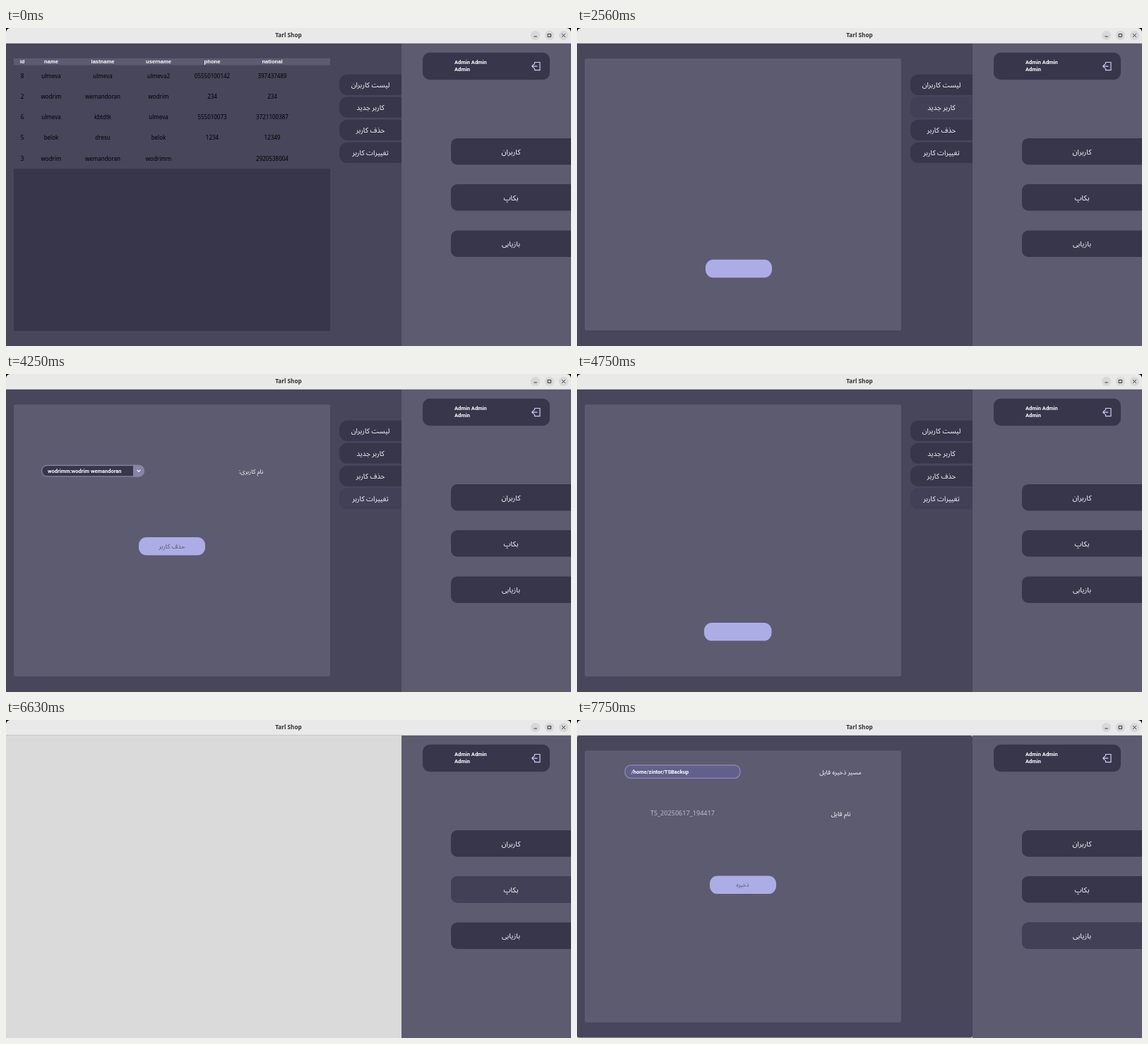
An HTML page that plays this animation: 800x450 px, repeating every 8000 ms.

```html
<!DOCTYPE html>
<html lang="fa">
<head>
<meta charset="utf-8">
<title>Tarl Shop</title>
<style>
  html, body { margin: 0; width: 100%; height: 100%; overflow: hidden; background: #000; }
  svg { display: block; width: 100vw; height: 100vh; }
  text { font-family: "Noto Sans", "Noto Sans Arabic", "DejaVu Sans", sans-serif; text-anchor: middle; fill: #fff; }
  .rtl { direction: rtl; }
  .head { font: bold 7.6px "Liberation Sans", sans-serif; }
  .cell { font-size: 8px; fill: #000; }
  .ui { font: 600 7.5px Roboto, sans-serif; text-anchor: start; }
  .panel { fill: #5c5b70; }
  .dark { fill: #37364b; }
  .hover { fill: #424056; }
  .action { fill: #adade6; }
  .input { fill: #615f8c; stroke: #8d8bb0; stroke-width: 1.3; }
  .line { fill: none; stroke-linecap: round; stroke-linejoin: round; }
</style>
</head>
<body>
<svg id="stage" viewBox="0 0 800 450" preserveAspectRatio="none"></svg>
<script>
const LOOP = 8000;

const rect = (x, y, w, h, r, cls) =>
  `<rect x="${x}" y="${y}" width="${w}" height="${h}" rx="${r}" class="${cls}"/>`;
const text = (x, y, size, str, cls = "", fill = "") =>
  `<text x="${x}" y="${y + size * 0.35}" class="${cls}" style="font-size:${size}px;${fill && "fill:" + fill}">${str}</text>`;
const label = (x, y, str, size = 8.5) => text(x, y + 0.4, size, str, "rtl");

// Content that is visible only from one moment to another
const during = (from, to, content) => `<g data-from="${from}" data-to="${to}">${content}</g>`;

// Button that runs off to the right, with rounded left corners
function tab(x, y, w, h, r, size, textX, str, from, to) {
  const d = `M${x + w} ${y}H${x + r}a${r} ${r} 0 0 0 ${-r} ${r}v${h - 2 * r}a${r} ${r} 0 0 0 ${r} ${r}H${x + w}z`;
  const lit = from ? during(from, to, `<path class="hover" d="${d}"/>`) : "";
  return `<path class="dark" d="${d}"/>${lit}${label(textX, y + h / 2, str, size)}`;
}
const sideTab = (y, str, from, to) => tab(472, y, 88, 29.2, 11.5, 10, 516, str, from, to);
const mainTab = (y, str, from, to) => tab(630, y, 170, 37.5, 9, 10.3, 715, str, from, to);

const panel = rect(11, 43.3, 448, 384.7, 2.5, "panel");
const input = (x, y, w) => rect(x + 0.6, y + 0.6, w - 1.2, 18.6, 8, "input");
const action = (x, y, w = 94) => rect(x, y, w, 25.6, 11, "action");
const actionText = (x, y, str, size = 9) => text(x, y, size, str, "rtl", "#55546a");

function combo(x, y, w, str = "") {
  const split = x + w - 16, right = x + w, cx = split + 8, cy = y + 8.3;
  return rect(x + 0.6, y + 0.6, w - 1.2, 15.4, 7.5, "dark") +
    `<path fill="#8784a6" d="M${split} ${y}H${right - 8}a8 8 0 0 1 8 8v.6a8 8 0 0 1 -8 8H${split}z"/>
     <rect x="${x + 0.6}" y="${y + 0.6}" width="${w - 1.2}" height="15.4" rx="7.5" fill="none" stroke="#8784a6" stroke-width="1.2"/>
     <path class="line" stroke="#fff" stroke-width="1.3" d="M${cx - 2} ${cy - 1}l2 2l2 -2"/>
     <text class="ui" x="${x + 9}" y="${y + 10.8}">${str}</text>`;
}

const columns = [[23, "id"], [64, "name"], [137, "lastname"], [216, "username"], [292, "phone"], [377, "national"]];
const users = [
  ["8", "ulmeva", "ulmeva", "ulmeva2", "05550100142", "397437489"],
  ["2", "wodrim", "wemandoran", "wodrim", "234", "234"],
  ["6", "ulmeva", "kbtdtk", "ulmeva", "555010073", "3721100387"],
  ["5", "belok", "dresu", "belok", "1234", "12349"],
  ["3", "wodrim", "wemandoran", "wodrimm", "", "2920538004"]
];

const table = rect(11, 43, 448, 9.6, 0, "panel") + rect(11, 199, 448, 229.7, 0, "dark") +
  columns.map(([x, name], i) =>
    text(x, 47.3, 7.6, name, "head") +
    users.map((user, row) => text(x, 67.7 + row * 29.25, 8, user[i], "cell")).join("")
  ).join("");

// Two-column user fields, starting at the given row centre
const fields = y =>
  input(31, y - 10, 96.5) + label(149, y, "نام:") +
  input(311.5, y - 10, 73) + label(418, y, "نام خانوادگی:") +
  input(31, y + 49, 76.5) + label(139, y + 59, "شماره ملی:") +
  input(311.5, y + 49, 74) + label(418.5, y + 59, "شماره تلفن:") +
  input(31, y + 108, 81) + label(142, y + 118, "نام کاربری:");

const screens =
  during(0, 2500, table) +
  during(2500, 3560, panel + action(182, 327.7)) +
  during(2630, 3560, fields(73) + actionText(229, 340.5, "کاربر جدید")) +
  during(3560, 4690, panel + action(188, 231)) +
  during(3630, 4690, combo(50, 128.8, 146, "wodrimm:wodrim wemandoran") +
    label(347, 137.5, "نام کاربری:") + actionText(235, 244, "حذف کاربر")) +
  during(4690, 6630, panel + action(180, 352, 95.5)) +
  during(4810, 6630, text(95, 68.3, 8.7, "Username:") + combo(194.5, 59.7, 82) +
    fields(122) + actionText(228, 365, "بروزرسانی اطلاعات"));

const userArea = `<rect y="22" width="560" height="428" fill="#47465b"/>` +
  sideTab(65.8, "لیست کاربران") +
  sideTab(97.6, "کاربر جدید", 2250, 3060) +
  sideTab(129.7, "حذف کاربر", 3130, 4250) +
  sideTab(161.8, "تغییرات کاربر", 4250, 5380) + screens;

const backupArea = `<rect y="22" width="560" height="427.5" rx="3" fill="#47465b"/>` + panel + action(188, 220.5);
const backupForm = `${input(67.5, 63.2, 164)}<text class="ui" x="77" y="75.6">/home/zintor/TSBackup</text>` +
  label(373, 73.5, "مسیر ذخیره فایل", 9) +
  text(149.5, 132.3, 9.1, "TS_20250617_194417", "", "#bdbcca") +
  label(373.5, 132.5, "نام فایل", 9) + actionText(234.5, 233.3, "ذخیره", 8.2);

const sidebar = `<rect x="560" y="22" width="240" height="428" class="panel"/>` +
  rect(590, 34.8, 180, 38.4, 10, "dark") +
  `<text class="ui" x="635" y="51.2">Admin Admin</text><text class="ui" x="635" y="61.2">Admin</text>
   <path class="line" stroke="#cdcdf2" stroke-width="1.2"
     d="M748.5 50.8v-2.3h7.5v11.2h-7.5v-2.3M752 54.1h-7.3m2.6 -2.6l-2.6 2.6l2.6 2.6"/>` +
  mainTab(155.9, "کاربران", 5500, 6250) +
  mainTab(221, "بکاپ", 6380, 7630) +
  mainTab(286.5, "بازیابی", 7750, LOOP);

const titleBar = `<path fill="#e9e9e9" d="M0 22V6a6 6 0 0 1 6 -6H794a6 6 0 0 1 6 6V22z"/>
  <rect y="21" width="800" height="1" fill="#c9c9c9"/>` +
  `<text x="400" y="13.4" style="font-weight:700;font-size:8.2px;fill:#303030">Tarl Shop</text>` +
  [749.5, 769.5, 789.5].map(x => `<circle cx="${x}" cy="10.5" r="6.6" fill="#d8d8d8"/>`).join("") +
  `<path class="line" stroke="#333" d="M747.8 12h3.6M767.5 8.5h4v4h-4zM787.4 8.4l4.2 4.2m0 -4.2l-4.2 4.2"/>`;

const stage = document.getElementById("stage");
stage.innerHTML = `<rect y="21" width="560" height="429" fill="#dadada"/>` +
  during(0, 6630, userArea) +
  during(6810, LOOP, backupArea) +
  during(6940, LOOP, backupForm) +
  sidebar + titleBar;

// Switch slightly early so that rounding never delays a change
const EARLY = 4;

for (const el of stage.querySelectorAll("[data-from]")) {
  const from = Number(el.dataset.from), to = Number(el.dataset.to);
  const times = [...new Set([0, from, to, LOOP])];
  const keyframes = times.map(time => ({
    offset: time % LOOP ? (time - EARLY) / LOOP : time / LOOP,
    visibility: time >= from && (time < to || to === LOOP) ? "visible" : "hidden",
    easing: "steps(1, end)"
  }));
  el.animate(keyframes, { duration: LOOP, iterations: Infinity });
}
</script>
</body>
</html>
```
